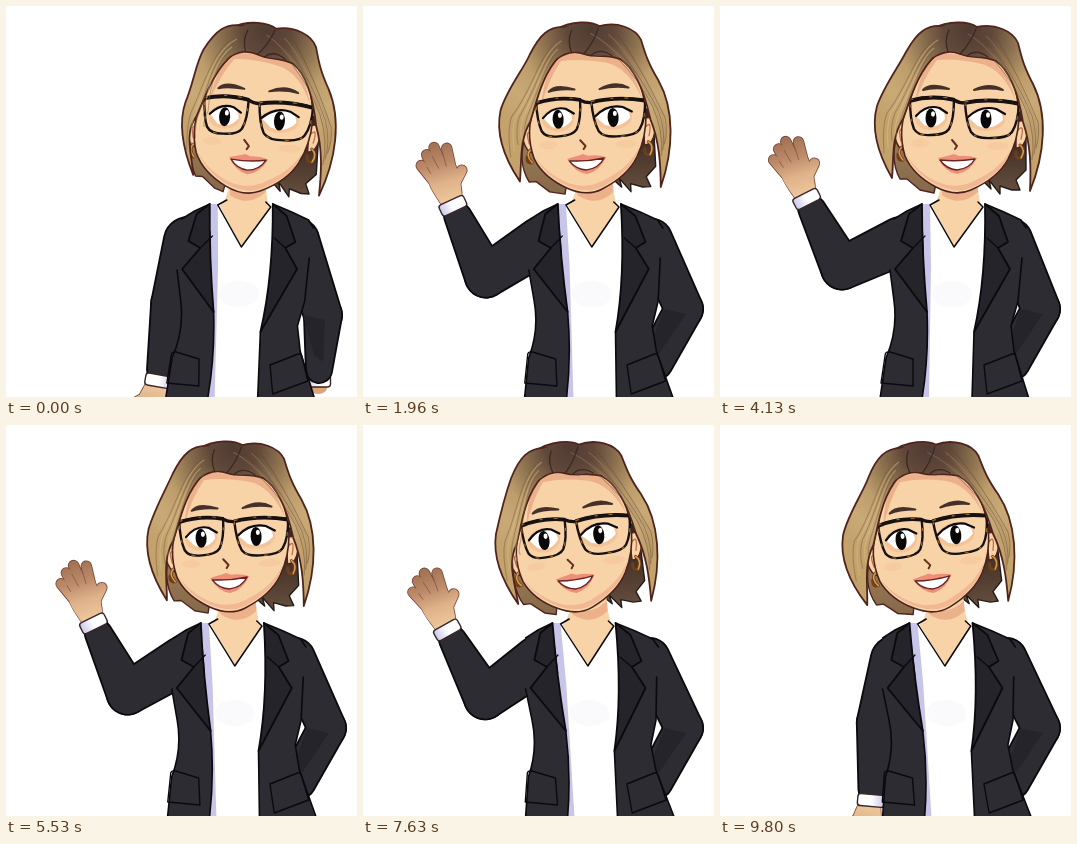
Write an HTML page with a canvas that moves like this. It is 351 by 391 pixels and loops after 9.87 s.

```html
<!DOCTYPE html>
<html lang="en">
<head>
<meta charset="utf-8">
<title>Waving woman</title>
<style>
html, body { margin: 0; width: 100%; height: 100%; overflow: hidden; background: #fff; }
canvas { display: block; width: 100vw; height: 100vh; }
</style>
</head>
<body>
<canvas id="stage" width="351" height="391"></canvas>
<script>
const ctx = document.getElementById('stage').getContext('2d');
const LOOP = 9870, STEP = 70, RAD = Math.PI / 180;
const INK = '#0b090d', CLOTH = '#2d2c32', FOLD = '#25242b', SKIN = '#f7d3a7', SHADE = '#ecb18a', RIM = '#50241d';

// Each track lists [time, value] and eases between neighbours.
const tracks = {
  headX: [[0, 3], [250, 3], [1500, -12], [2100, -12], [3000, 3], [3650, 3], [4130, 0], [5250, -12], [5900, -12], [7350, -21]],
  tilt: [[0, 3.5], [250, 3.5], [1500, -3], [2100, -3], [3000, 3.5], [3650, 3.5], [4130, 0], [5250, -3], [5900, -3], [7350, -7]],
  lock: [[0, 14], [700, 2], [1960, -3], [3150, 0], [4130, 0], [5530, 2], [7630, 7], [9520, 2], [9800, -3]],
  upper: [[0, 14], [900, 57], [1960, 57], [3150, 63], [4130, 65], [5530, 59], [7630, 54], [8400, 54], [9150, 15]],
  fore: [[0, 10], [1150, 144], [1560, 160], [1960, 155], [2400, 153], [3150, 162], [3640, 151], [4130, 153], [4650, 161],
    [5100, 152], [5530, 154], [5950, 146], [6450, 160], [6950, 145], [7350, 159], [7630, 151], [7950, 143], [8400, 153], [9450, 5]],
  hip: [[0, 0], [1050, 1]]
};

function valueAt(keys, t) {
  const i = keys.findIndex(k => k[0] > t);
  if (i < 0) return keys[keys.length - 1][1];
  if (i === 0) return keys[0][1];
  const [t0, a] = keys[i - 1], [t1, b] = keys[i];
  return a + (b - a) * (1 - Math.cos(Math.PI * (t - t0) / (t1 - t0))) / 2;
}

function shape(d, fill, line, width = 1.6) {
  const path = new Path2D(d);
  if (fill) { ctx.fillStyle = fill; ctx.fill(path); }
  if (line) { ctx.strokeStyle = line; ctx.lineWidth = width; ctx.stroke(path); }
}

function oval(x, y, rx, ry, fill) {
  ctx.beginPath();
  ctx.ellipse(x, y, rx, ry, 0, 0, 7);
  ctx.fillStyle = fill;
  ctx.fill();
}

function withStops(gradient, colors) {
  colors.forEach((c, i) => gradient.addColorStop(i / (colors.length - 1), c));
  return gradient;
}

const ramp = (x0, y0, x1, y1, ...colors) => withStops(ctx.createLinearGradient(x0, y0, x1, y1), colors);
const glow = (x, y, r, ...colors) => withStops(ctx.createRadialGradient(x, y, 0, x, y, r), colors);

function placed(x, y, angle, draw) {
  ctx.save();
  ctx.translate(x, y);
  ctx.rotate(angle);
  draw();
  ctx.restore();
}

// Hull of two circles.
function capsule(a, b, grow, color) {
  const dir = Math.atan2(b.y - a.y, b.x - a.x);
  const side = Math.acos((a.r - b.r) / Math.hypot(b.x - a.x, b.y - a.y));
  ctx.beginPath();
  ctx.arc(a.x, a.y, a.r + grow, dir + side, dir - side);
  ctx.arc(b.x, b.y, b.r + grow, dir - side, dir + side);
  ctx.closePath();
  ctx.fillStyle = color;
  ctx.fill();
}

function sleeve(shoulder, elbow, wrist) {
  for (const [grow, color] of [[1, INK], [-0.8, CLOTH]]) {
    capsule(shoulder, elbow, grow, color);
    capsule(elbow, wrist, grow, color);
  }
}

function cuff(w) {
  ctx.beginPath();
  ctx.roundRect(-w / 2, -9, w, 12, 3);
  ctx.fillStyle = ramp(-w / 2, 0, w / 2, 0, '#c9c7e8', '#fff', '#fff');
  ctx.fill();
  ctx.strokeStyle = '#3a2526';
  ctx.lineWidth = 1.4;
  ctx.stroke();
}

function hand() {
  const fingers = [[-13, -30, -20, -46], [-8, -36, -12, -55], [0, -38, -3, -60], [8, -36, 9, -56], [8, -20, 18, -31]];
  const skin = ramp(0, -62, 0, -5, '#a47355', '#bb8a69', '#dfb28a', '#edc59b');
  const palm = 'M-10 0 C-12 -10 -18 -20 -17 -32 Q-4 -45 13 -38 C15 -28 13 -12 10 0Z';
  const digits = (width, color) => {
    ctx.strokeStyle = color;
    ctx.lineWidth = width;
    for (const [x0, y0, x1, y1] of fingers) {
      ctx.beginPath();
      ctx.moveTo(x0, y0);
      ctx.lineTo(x1, y1);
      ctx.stroke();
    }
  };
  digits(11.5, '#784638');
  shape(palm, skin, '#784638', 1.4);
  digits(9.8, skin);
  shape(palm, skin);
  shape('M-13 -36 L-15 -43 M-4 -39 L-7 -52 M4 -39 L4 -52', null, '#93604a', 0.9);
}

function waveArm(p) {
  const a = p.upper * RAD, b = p.fore * RAD;
  const shoulder = { x: 181 + p.headX * 0.3, y: 235, r: 24 };
  const elbow = { x: shoulder.x - 65 * Math.sin(a), y: shoulder.y + 65 * Math.cos(a), r: 21 };
  const wrist = { x: elbow.x - 67 * Math.sin(b), y: elbow.y + 67 * Math.cos(b), r: 13.5 };
  placed(wrist.x, wrist.y, b - Math.PI, () => {
    ctx.translate(0, -12);
    placed(0, 0, 10 * RAD, hand);
  });
  sleeve(shoulder, elbow, wrist);
  placed(wrist.x, wrist.y, b - Math.PI, () => {
    ctx.translate(0, -8);
    cuff(27);
  });
}

function hipArm(p) {
  const mix = (a, b) => a + (b - a) * p.hip;
  const shoulder = { x: 292 + p.headX * 0.25, y: 233, r: 20 };
  const elbow = { x: mix(317, 321), y: mix(309, 303), r: 19 };
  const wrist = { x: mix(313, 292), y: mix(364, 356), r: mix(13, 18) };
  if (p.hip < 0.75) {
    placed(wrist.x, wrist.y + 14, p.hip * 0.5, () => {
      oval(-1, 4, 9, 6, '#dca477');
      cuff(23);
    });
  }
  sleeve(shoulder, elbow, wrist);
  shape(`M${elbow.x - 20} ${elbow.y} L${elbow.x + 2} ${elbow.y + 5} L${wrist.x + 4} ${wrist.y - 8} L${wrist.x - 5} ${wrist.y - 15}Z`, FOLD);
}

function torso(p) {
  const k = p.headX * 0.55 / 150;
  ctx.save();
  ctx.transform(1, 0, -k, 1, 360 * k, 0);
  shape('M203 198 L235 194 L265 199 L265 250 L253 330 L253 393 L200 393 L207 305Z', '#fff');
  shape('M202 198 L210 198 L211 260 L209 393 L200 393 L206 305Z', '#c8c5eb');
  oval(232, 288, 20, 13, '#fafafd');
  shape('M221 170 Q222 190 212 200 L234 241 L262 202 Q257 190 258 168Z', SKIN);
  shape('M222 181 Q238 193 258 176 L258 186 Q240 202 222 189Z', SHADE);
  shape('M219 194 L210 199 L234 241 L263 201 L258 196', null, INK, 1.5);

  const left = 'M202 198 L187 205 L174 214 L170 264 L174 295 Q178 324 166 352 L160 393 L202 393 Q209 350 207 305 Q202 250 202 198Z';
  const right = 'M265 198 L284 206 L301 214 Q308 245 298 295 L291 320 L294 345 L309 393 L252 393 L254 326 C262 290 266 250 265 198Z';
  shape(left, CLOTH);
  shape(right, CLOTH);
  shape('M202 198 L187 205 L174 213 M170 264 L174 295 Q178 324 166 352 L160 393 M202 393 Q209 350 207 305', null, INK);
  shape('M265 198 L284 206 L301 214 L306 222 M302 252 L298 295 L291 320 L294 345 L309 393 M252 393 L254 326', null, INK);
  shape('M202 198 L189 208 L181 235 L193 242 L175 263 L207 306 Q202 250 202 198Z', FOLD, INK, 1.8);
  shape('M265 198 L279 210 L288 236 L278 242 L290 263 L254 326 C262 290 266 250 265 198Z', FOLD, INK, 1.8);
  shape('M193 242 L205 230 M278 242 L267 232', null, INK, 1.2);
  shape('M165 350 Q165 345 170 346 L193 353 L193 380 L161 377Z M264 359 L292 348 Q295 347 296 351 L302 375 L267 388Z', null, INK, 1.4);
  ctx.restore();
}

function backHair(p) {
  const s = p.lock * 0.4;
  shape(`M180 120 C${172 + s} 142 ${172 + s} 158 ${180 + s} 173 L${187 + s} 173 L${200 + s} 184 L214 187 L222 150Z`, ramp(0, 120, 0, 190, '#9d8057', '#85674a'), RIM, 1.4);
  shape('M260 150 L265 177 L271 183 L269 174 L280 188 L280 180 L292 184 L300 184 L296 174 L306 164 L306 100Z', ramp(0, 125, 0, 190, '#382821', '#68503e'), '#241a1a', 1.4);
}

function ear(x, y, dir) {
  shape(`M${x} ${y - 17} Q${x + dir * 15} ${y - 22} ${x + dir * 11} ${y - 4} Q${x + dir * 8} ${y + 10} ${x} ${y + 9}Z`, SKIN, '#4f241c', 1.4);
  shape(`M${x + dir * 2} ${y - 9} Q${x + dir * 9} ${y - 16} ${x + dir * 5} ${y}`, null, '#be704f', 1.3);
  shape(`M${x + dir * 4} ${y + 6} q${dir * 6} 5 1 13 q-6 1 -5 -6`, null, '#713e1c', 3);
  shape(`M${x + dir * 4} ${y + 6} q${dir * 6} 5 1 13`, null, '#d99b49', 1.5);
}

function eye(x, y, w) {
  oval(x, y + 1, w + 2, 12, 'rgba(235,148,104,.25)');
  shape(`M${x - w} ${y} Q${x - w * 0.4} ${y - 13} ${x + w * 0.6} ${y - 9} Q${x + w} ${y - 6} ${x + w} ${y + 2} Q${x + w * 0.4} ${y + 13} ${x - w * 0.5} ${y + 8}Z`, '#fff');
  oval(x, y + 1, 5.5, 9.5, '#090708');
  oval(x + 2, y - 3, 2, 2.7, '#fff');
  shape(`M${x - w - 1} ${y - 1} Q${x - w * 0.3} ${y - 13} ${x + w * 0.6} ${y - 9} L${x + w + 2} ${y - 4}`, null, INK, 2.2);
}

function glasses() {
  const rims = 'M190 94 Q211 88 234 93 Q234 114 229 123 Q225 129 211 129 Q198 130 194 123 Q190 113 190 94Z M245 96 Q270 91 299 97 Q298 117 292 126 Q288 132 272 132 Q256 133 251 126 Q246 116 245 96Z';
  shape(rims, null, '#171112', 2.4);
  shape('M190 95 Q211 89 234 94 Q239 97 245 97 Q270 92 299 98 L305 106', null, '#171112', 3.4);
  ctx.setLineDash([3, 17, 2, 12]);
  shape(rims, null, '#946633', 1.2);
  ctx.setLineDash([]);
}

function face() {
  ear(296, 133, 1);
  ear(186, 135, -1);
  shape('M238 42 C205 44 196 72 189 97 C181 113 179 130 185 150 Q193 169 216 181 Q235 191 251 184 Q278 172 288 153 Q298 135 299 112 C298 78 290 44 238 42Z', SKIN, '#4b221c', 1.6);
  shape('M186 148 Q195 168 217 179 Q236 188 251 182 Q277 170 287 153 L291 143 Q281 162 258 173 Q239 184 220 177 Q198 168 186 148Z', '#f2b893');
  shape('M214 48 Q226 46 240 49 Q252 53 270 53 Q288 62 296 96 Q284 64 262 58 Q236 52 217 54 Q203 72 195 98 Q199 66 214 48Z', SHADE);
  oval(200, 137, 9, 4, 'rgba(245,166,125,.18)');
  oval(278, 140, 11, 4, 'rgba(245,166,125,.18)');
  eye(211, 111, 14);
  eye(266, 112, 17);
  shape('M203 84 Q210 76 229 83 Q212 81 203 84Z', '#45302a', '#45302a', 2);
  shape('M254 84 Q270 76 283 84 Q269 81 254 84Z', '#45302a', '#45302a', 2);
  glasses();
  shape('M232 134 L237 140 L235 143', null, '#64301f', 2);
  shape('M218 152 Q228 150 234 148 L239 150 Q248 149 257 152 Q250 166 237 168 Q225 166 218 152Z', '#ef8f79');
  shape('M220 154 Q238 156 255 153 Q249 163 237 164 Q226 163 220 154Z', '#fff', '#66251f', 1.4);
}

function frontHair(p) {
  const h = p.lock;
  const left = `M231 22 C206 14 195 30 186 46 C179 60 ${164 + h} 80 ${157 + h} 100 C${151 + h} 122 ${157 + h} 146 ${172 + h * 0.8} 172 C${174 + h * 0.5} 153 171 131 183 113 C190 95 197 66 216 49 L233 38Z`;
  const right = 'M212 23 C230 13 250 16 257 21 C275 17 293 25 298 37 C302 53 304 61 313 78 C328 108 325 148 310 185 C311 162 311 139 303 116 C299 92 292 66 276 55 C262 49 252 53 240 48 C230 44 222 46 212 52Z';
  const tint = glow(248, 24, 120, '#4f3b33', '#604839', '#8d7250', '#bd9d6b', '#c9aa77', '#c3a26c');
  shape(right, tint, RIM, 1.8);
  shape(left, tint, RIM, 1.8);
  shape('M213 24 C230 16 250 18 256 22 L262 50 Q252 52 240 47 C230 43 222 45 213 51Z', tint);
  ctx.globalAlpha = 0.45;
  for (let i = 0; i < 5; i++) {
    const x = 162 + h * 0.8 + i * 4;
    shape(`M${220 - i * 2} ${30 + i * 4} C${195 + i * 2} ${43 + i * 3} ${190 + i} 78 ${x + 5} 107 Q${x} 120 ${x + 2} ${147 - i * 6}`, null, i % 2 ? '#e0c48e' : '#765a3b', 1.1);
    shape(`M${239 + i * 9} ${27 + i} C${266 + i * 4} 41 ${291 + i * 2} 70 ${306 + i * 3} ${104 + i * 3} Q${316 + i} 130 ${312 + i} ${154 - i * 3}`, null, i % 2 ? '#a98862' : '#5a4335', 1);
  }
  ctx.globalAlpha = 1;
  shape('M228 46 Q224 34 229 24 M240 48 Q250 38 256 23 M247 50 Q256 42 268 51', null, '#392920', 1.3);
}

function inHead(p, draw) {
  placed(235 + p.headX, 187, p.tilt * RAD, () => {
    ctx.translate(-235, -187);
    draw(p);
  });
}

function render(now) {
  const t = Math.floor((now % LOOP) / STEP) * STEP;
  const pose = {};
  for (const name in tracks) pose[name] = valueAt(tracks[name], t);
  ctx.fillStyle = '#fff';
  ctx.fillRect(0, 0, 351, 391);
  ctx.lineCap = ctx.lineJoin = 'round';
  waveArm(pose);
  hipArm(pose);
  inHead(pose, backHair);
  torso(pose);
  inHead(pose, face);
  inHead(pose, frontHair);
}

let start;
function tick(now) {
  start ??= now;
  render(now - start);
  requestAnimationFrame(tick);
}
requestAnimationFrame(tick);
</script>
</body>
</html>
```
